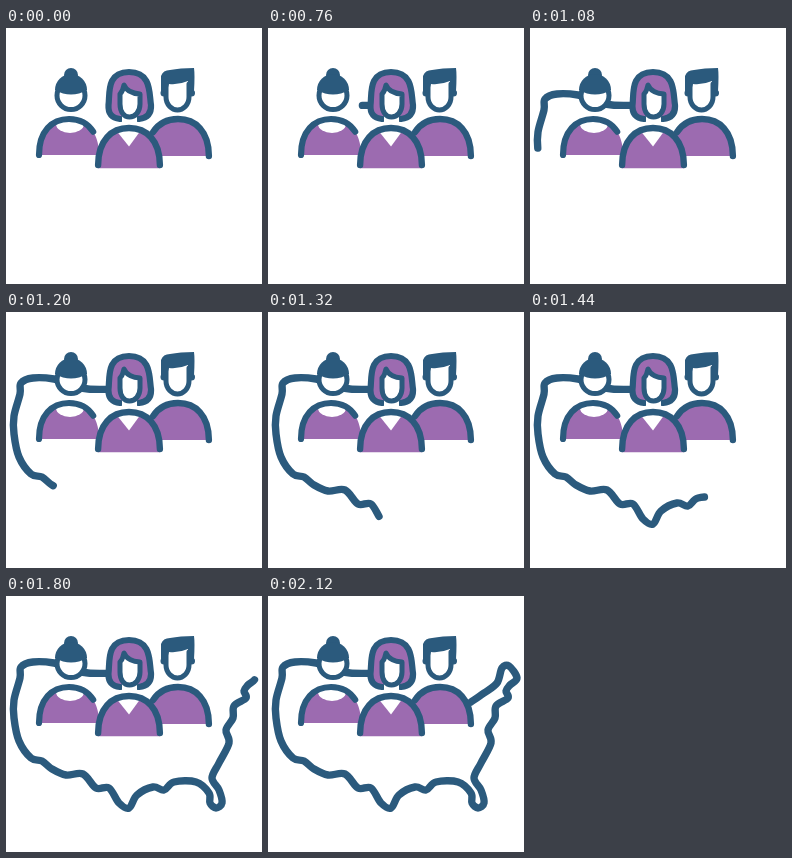
An HTML page that plays this animation: 256 px wide and 256 px high, repeating every 5 s.

```html
<!DOCTYPE html>
<html lang="en">
<head>
<meta charset="utf-8">
<title>People and map</title>
<style>
  html, body { margin: 0; width: 100%; height: 100%; overflow: hidden; background: #fff; }
  svg { display: block; width: 100%; height: 100%; }
  .line { fill: none; stroke: #2b5a7d; stroke-width: 6.2; stroke-linecap: round; stroke-linejoin: round; }
  .navy { fill: #2b5a7d; }
  .purple { fill: #9c6bb0; }
  .white { fill: #fff; }
  .face { fill: #fff; stroke-width: 5; }
  .open-right { stroke-dasharray: 77 100; }
  .open-left { stroke-dasharray: 77 100; stroke-dashoffset: -23; }
  #map { stroke-width: 7.4; }
</style>
</head>
<body>
<svg viewBox="0 0 256 256">
  <defs>
    <path id="dome" pathLength="100" d="M-30 36C-30 12 -17 0 0 0S30 12 30 36"/>
  </defs>

  <path id="map" class="line"/>

  <g id="left-woman">
    <use href="#dome" class="purple" x="63" y="91"/>
    <ellipse class="white" cx="64" cy="96" rx="14" ry="9"/>
    <use href="#dome" class="line open-right" x="63" y="91"/>
    <circle class="navy" cx="65" cy="47" r="7"/>
    <circle class="line face" cx="65" cy="67.5" r="14"/>
    <path class="navy" d="M49 62Q65 71 81 62A16 16 0 0 0 49 62Z"/>
  </g>

  <g id="man" >
    <g transform="translate(172 91) scale(1.03)">
      <use href="#dome" class="purple"/>
      <use href="#dome" class="line open-left"/>
    </g>
    <circle class="navy" cx="158" cy="65" r="3.5"/>
    <circle class="navy" cx="185.5" cy="65" r="3.5"/>
    <path class="line face" d="M160 56V69C160 77 166 82 171.5 82S183 77 183 69V56"/>
    <path class="navy" d="M155 63V48Q157 42 164 42Q174 40 188 40Q189 47 188 63H182V53Q173 57 163 56L161 63Z"/>
  </g>

  <g id="front-woman">
    <g transform="translate(123 100) scale(1.03)">
      <path class="purple" d="M-30 39V36C-30 12 -17 0 0 0S30 12 30 36V39Z"/>
      <path class="white" d="M-12 3L0 18L11 3Z"/>
      <use href="#dome" class="line"/>
    </g>
    <path class="line purple" style="fill:#9c6bb0" d="M114 91C106 90 102 86 102.500 77C104 66 100 44 123 44S143 66 145 77C145.500 86 141 90 133 91"/>
    <path class="white" d="M116 95V84H131V95Z"/>
    <path class="line face" d="M114 66V76C114 84 118 89 123.500 89S134 84 134 76V66Q121 65 118 57Q117 63 114 66Z"/>
  </g>
</svg>
<script>
  const LOOP = 5000, STEP = 40, START = 580, DURATION = 1560;
  const map = document.getElementById('map');

  // Key points of the border, from behind the hair round to the man's shoulder.
  const border = `116,77 82,77 64,72 48,67 27,66 15,71 14,82 8,104 8,122 13,145 25,162 36,165
    46,173 60,179 77,178 90,192 103,192 113,207 123,212 131,199 147,191 158,194 168,186 190,186
    203,197 204,207 210,212 216,207 213,194 206,182 213,167 223,147 220,134 227,122 228,110
    240,102 238,95 242,89 249,82 241,70 234,72 229,87 216,97 203,106`
    .split(/\s+/).map(pair => pair.split(',').map(Number));

  // Catmull-Rom spline through the points, as cubic curves.
  function smoothPath(points) {
    const at = i => points[Math.max(0, Math.min(points.length - 1, i))];
    const handle = (i, side) => at(i).map((v, k) => v + side * (at(i + 1)[k] - at(i - 1)[k]) / 6);
    return points.slice(1).reduce(
      (path, point, i) => `${path}C${handle(i, 1)} ${handle(i + 1, -1)} ${point}`,
      `M${points[0]}`);
  }

  map.setAttribute('d', smoothPath(border));
  const total = map.getTotalLength();
  const easeInOut = u => (1 - Math.cos(Math.PI * u)) / 2;

  function draw() {
    const time = Math.floor((performance.now() % LOOP) / STEP) * STEP;
    const progress = Math.max(0, Math.min(1, (time - START) / DURATION));
    map.style.visibility = time < 760 ? 'hidden' : 'visible';
    map.style.strokeDasharray = `${easeInOut(progress) * total} ${total + 10}`;
    requestAnimationFrame(draw);
  }
  draw();
</script>
</body>
</html>
```
